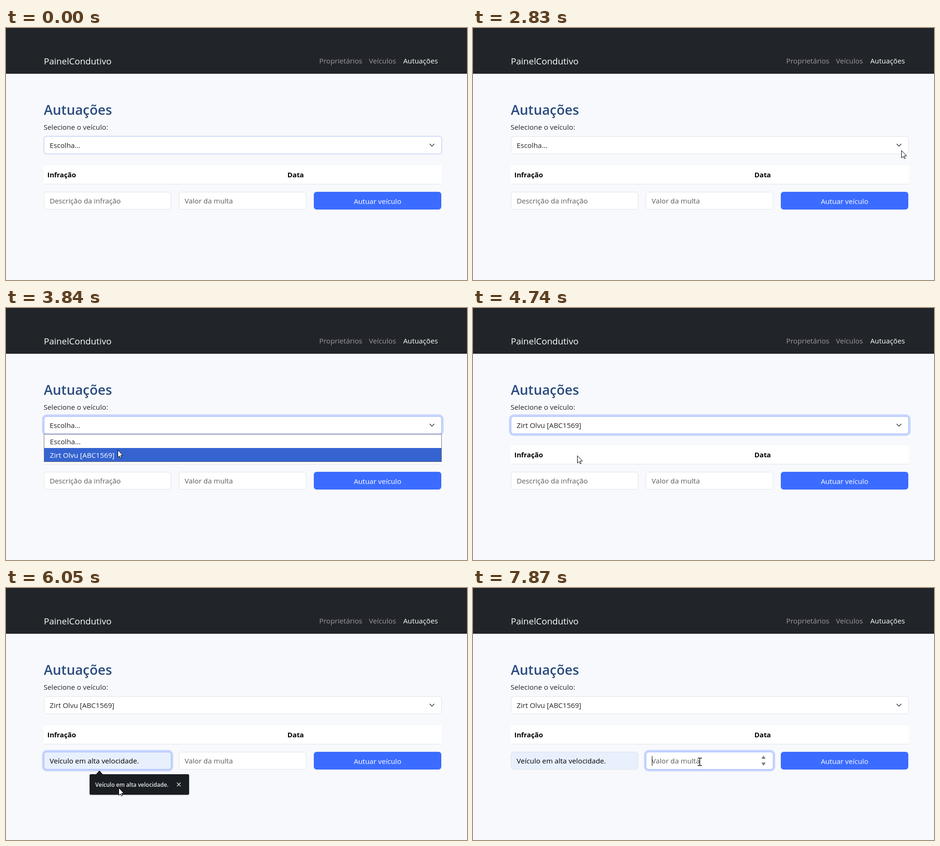
Animation, 987 px wide and 540 px high, one loop 8 s. Source, as an HTML page:

```html
<!DOCTYPE html>
<html lang="pt-BR">
<head>
<meta charset="utf-8">
<title>Autuações</title>
<style>
  html, body { margin: 0; width: 100%; height: 100%; overflow: hidden; background: #f8f9fc; }
  svg { display: block; width: 987px; height: 540px; }
  text { font: 15.2px "Open Sans", "Noto Sans", sans-serif; fill: #212529; white-space: pre; }
  .brand { font-size: 19px; fill: #fff; }
  .title { font-size: 28.8px; font-weight: 600; fill: #2a4b7f; }
  .head { font-size: 14.8px; font-weight: 700; fill: #000; }
  .muted { fill: #9f98a2; }
  .hint { fill: #595c5f; }
  .light { fill: #fff; }
  .tip { font-size: 12px; font-weight: 600; fill: #e9ebed; }
  .box { fill: #fff; stroke: #dee2e6; }
  .ring { fill: #3c6cff; }
  .caret { fill: #000; }
</style>
</head>
<body>
<svg viewBox="0 0 987 540">
  <rect width="987" height="540" fill="#f8f9fc"/>
  <rect y="98" width="987" height="2" opacity=".03"/>
  <rect width="987" height="98" fill="#212529"/>
  <text class="brand" x="81" y="78">PainelCondutivo</text>
  <text class="muted" x="670.5" y="76">Proprietários</text>
  <text class="muted" x="777" y="76">Veículos</text>
  <text class="light" x="850.5" y="76">Autuações</text>

  <text class="title" x="81" y="186">Autuações</text>
  <text x="80.5" y="218">Selecione o veículo:</text>

  <rect x="81" y="294" width="852" height="40" fill="#fff"/>
  <rect x="81" y="334" width="852" height="1" fill="#dee2e6"/>
  <text class="head" x="88.5" y="320">Infração</text>
  <text class="head" x="602.5" y="320">Data</text>

  <rect class="ring" id="selectRing"/>
  <rect class="box" id="selectBox"/>
  <text id="choice" x="93.5" y="257"></text>
  <path d="M907.5 248.7l4.5 4.5 4.5-4.5" fill="none" stroke="#343a40" stroke-width="1.6" stroke-linecap="round" stroke-linejoin="round"/>

  <rect class="ring" id="descRing"/>
  <rect class="box" id="descBox"/>
  <text id="descText" x="93.5" y="376"></text>
  <rect class="caret" id="descCaret" y="360" width="1" height="21"/>

  <rect class="ring" id="fineRing"/>
  <rect class="box" id="fineBox"/>
  <text class="hint" x="382.5" y="376">Valor da multa</text>
  <rect class="caret" id="fineCaret" x="383" y="360" width="1" height="21"/>
  <path id="spinner" d="M617.5 366l4.5-7 4.5 7zM617.5 374l4.5 7 4.5-7z" fill="#7d7d7d"/>

  <rect id="button" x="659" y="351" width="273" height="38" rx="6"/>
  <text class="light" x="795.5" y="377" text-anchor="middle">Autuar veículo</text>

  <g id="menu">
    <rect x="81.5" y="270.5" width="851" height="59" fill="#fff" stroke="#767676"/>
    <rect id="highlight" x="82" width="850" fill="#3564d0"/>
    <text id="option0" x="94" y="292">Escolha...</text>
    <text id="option1" x="94" y="321"></text>
  </g>

  <g id="tooltip">
    <rect x="178" y="399" width="215" height="46" rx="4" opacity=".12"/>
    <path d="M192 400l8-9 8 9z" fill="#1a1d21"/>
    <rect x="179" y="399" width="213" height="44" rx="3" fill="#1a1d21"/>
    <text class="tip" x="191" y="426">Veículo em alta velocidade.</text>
    <path id="close" d="M366 417l8 8m0-8l-8 8" stroke="#e9ebed" stroke-width="1.3"/>
  </g>

  <g id="pointer">
    <path id="arrow" d="M.5.5V16.3L4 12.9 6.4 18 8.6 17 6.3 12H11.3Z" fill="#fff" stroke="#000"/>
    <path id="beam" d="M-4-7.5H-1L.5-6.5 2-7.5H5M.5-6.5V7.5M-4 8.5H-1L.5 7.5 2 8.5H5" fill="none" stroke="#000" stroke-width="1.3"/>
  </g>
</svg>
<script>
const LOOP = 8000;
const CAR = "Zirt Olvu [ABC1569]";
const OFFENCE = "Veículo em alta velocidade.";

// Pointer path: time, x, y
const PATH = [
  [590, 264, 512], [800, 520, 400], [1010, 826, 230], [1150, 745, 185],
  [1290, 559, 157], [1360, 470, 96], [1500, 328, 62], [1640, 400, 60],
  [1920, 640, 130], [2200, 819, 241], [2410, 850, 330], [2550, 880, 358],
  [2690, 905, 310], [2830, 917, 262], [3110, 917, 262], [3300, 760, 275],
  [3500, 470, 290], [3670, 300, 300], [3800, 239, 304], [3880, 239, 304],
  [3950, 232, 309], [4660, 232, 309], [4950, 190, 345], [5090, 161, 371],
  [5560, 161, 371], [5800, 190, 405], [6000, 241, 428], [6510, 241, 428],
  [6660, 400, 395], [6800, 490, 372], [7260, 490, 372], [7310, 485, 372]
];

const el = Object.fromEntries([...document.querySelectorAll("[id]")].map(e => [e.id, e]));
const set = (node, attrs) => {
  for (const key in attrs) node.setAttribute(key, attrs[key]);
};
const show = (node, on) => { node.style.display = on ? "" : "none"; };
const write = (node, text) => { if (node.textContent !== text) node.textContent = text; };
const ramp = (t, from, to) => Math.min(1, Math.max(0, (t - from) / (to - from)));
const inside = (p, x, y, w, h) => p.x >= x && p.x < x + w && p.y >= y && p.y < y + h;

function pointerAt(time) {
  const t = 30 + 70 * Math.floor((time - 30) / 70);
  const next = PATH.findIndex(key => key[0] > t);
  if (next === 0) return { x: PATH[0][1], y: PATH[0][2] };
  if (next < 0) return { x: PATH.at(-1)[1], y: PATH.at(-1)[2] };
  const [t0, x0, y0] = PATH[next - 1], [t1, x1, y1] = PATH[next];
  const k = ramp(t, t0, t1);
  return { x: Math.round(x0 + (x1 - x0) * k), y: Math.round(y0 + (y1 - y0) * k) };
}

function drawControl(name, x, y, width, focus, fill = "#fff") {
  const spread = 4 * focus;
  set(el[name + "Ring"], {
    x: x - spread, y: y - spread, width: width + 2 * spread, height: 38 + 2 * spread,
    rx: 6 + spread, opacity: 0.25 * focus
  });
  const mix = (a, b) => Math.round(a + (b - a) * focus);
  set(el[name + "Box"], {
    x: x + 0.5, y: y + 0.5, width: width - 1, height: 37, rx: 5.5,
    style: `fill:${fill};stroke:rgb(${mix(222, 158)},${mix(226, 182)},${mix(230, 255)})`
  });
}

function tooltipAlpha(t) {
  if (t < 6380) return ramp(t, 5160, 5360);
  return t < 6450 ? 0.6 : t < 6520 ? 0.11 : 0;
}

function draw(t) {
  const p = pointerAt(t);
  const selectFocus = t < 70 ? 0.4 : ramp(t, 2960, 3090) - ramp(t, 5090, 5230);
  const fineFocus = ramp(t, 6800, 6940);
  const descFocus = ramp(t, 5090, 5230) - fineFocus;
  const previewed = t >= 5850, filled = t >= 6380;

  drawControl("select", 81, 232, 852, selectFocus);
  drawControl("desc", 81, 351, 273, descFocus, previewed ? "#e8f0fe" : "#fff");
  drawControl("fine", 370, 351, 273, fineFocus);

  write(el.choice, t < 4200 ? "Escolha..." : CAR);
  write(el.descText, previewed ? OFFENCE : "Descrição da infração");
  el.descText.style.fill = previewed ? "#000" : "#595c5f";

  const blink = start => Math.floor((t - start) / 530) % 2 === 0;
  show(el.descCaret, t >= 5090 && t < 6800 && blink(filled ? 6380 : 5090));
  set(el.descCaret, { x: filled ? 285 : 94 });
  show(el.fineCaret, t >= 6800 && blink(6810));

  const overFine = inside(p, 370, 351, 273, 38);
  show(el.spinner, fineFocus > 0 || overFine);
  set(el.button, { fill: inside(p, 659, 351, 273, 38) ? "#335cd9" : "#3c6cff" });

  const row = p.y >= 300 ? 1 : 0;
  show(el.menu, t >= 3090 && t < 4200);
  set(el.highlight, { y: row ? 300 : 271, height: 29 });
  write(el.option1, CAR);
  [el.option0, el.option1].forEach((option, i) => {
    option.style.fill = i === row ? "#fff" : "#212529";
  });

  const alpha = tooltipAlpha(t);
  show(el.tooltip, alpha > 0);
  set(el.tooltip, {
    opacity: alpha,
    transform: `translate(285.5 421) scale(${0.95 + 0.05 * alpha}) translate(-285.5 -421)`
  });
  show(el.close, previewed);

  const overText = overFine || inside(p, 81, 351, 273, 38);
  show(el.pointer, t >= 590);
  show(el.arrow, !overText);
  show(el.beam, overText);
  set(el.pointer, { transform: `translate(${p.x} ${p.y})` });
}

const start = performance.now();
function tick() {
  draw((performance.now() - start) % LOOP);
  requestAnimationFrame(tick);
}
tick();
</script>
</body>
</html>
```
